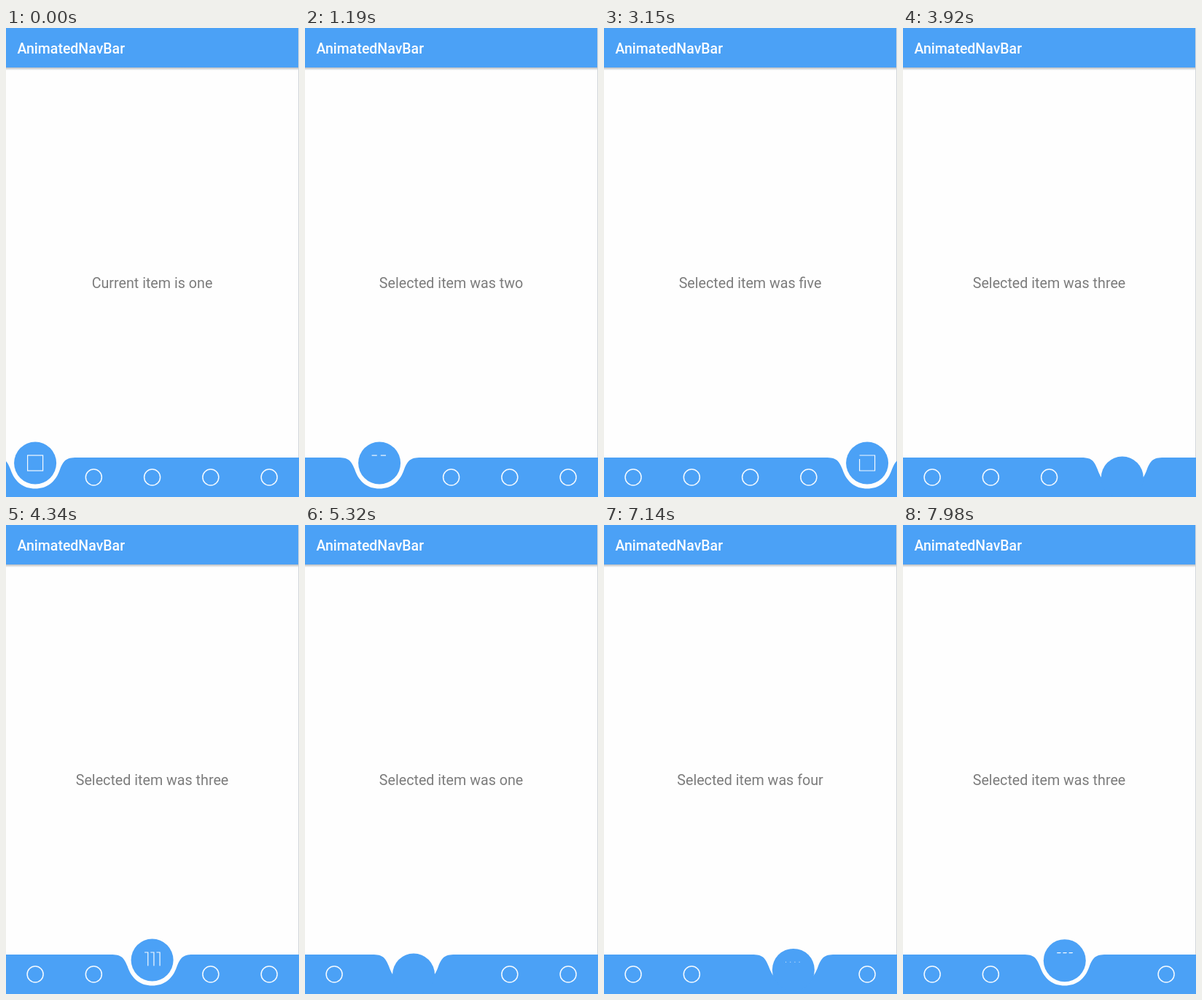
Animation of 402x642 px, one loop 8000 ms. Source, as an HTML page:

```html
<!DOCTYPE html>
<html lang="en">
<head>
<meta charset="utf-8">
<title>AnimatedNavBar</title>
<style>
  html, body { margin: 0; width: 100%; height: 100%; overflow: hidden; background: #fefefe; }
  svg { display: block; width: 402px; height: 642px; }
  text { font-family: Roboto, sans-serif; }
  .title { font-size: 19.5px; font-weight: 500; fill: #fbfdff; }
  .label { font-size: 19.7px; fill: #7c7c7c; text-anchor: middle; }
  .blue { fill: #4ba1f6; }
  .line { fill: none; stroke: #f4faff; }
</style>
</head>
<body>
<svg viewBox="0 0 402 642">
  <defs>
    <linearGradient id="shade" x2="0" y2="1">
      <stop offset="0" stop-color="#b9bcc0"/>
      <stop offset="1" stop-color="#fefefe"/>
    </linearGradient>
  </defs>
  <rect width="402" height="642" fill="#fefefe"/>
  <rect y="54" width="402" height="4" fill="url(#shade)"/>
  <rect class="blue" width="402" height="54"/>
  <rect x="401" width="1" height="642" fill="#d3d6da"/>
  <text class="title" x="15.5" y="34.5">AnimatedNavBar</text>
  <text class="label" id="label" x="200.5" y="356"></text>
  <path class="blue" id="bar"/>
  <g class="line" id="rings" stroke-width="1.5"></g>
  <g id="ball">
    <circle class="blue" r="29"/>
    <g class="line" id="icons" stroke-width="1.2"></g>
  </g>
</svg>
<script>
const LOOP = 8000, SLIDE = 550, DRAW = 1000, BOB = 200;
const TOP = 588, REST = 595.5, DEPTH = 20, REACH = 60;
const WORDS = ['one', 'two', 'three', 'four', 'five'];
const BOXES = [1, 2, 3, 4, 1];
// tap time, tapped item
const TAPS = [[815, 1], [2080, 4], [3690, 2], [5110, 0], [6696, 3], [7620, 2]];

const $ = id => document.getElementById(id);
const itemX = i => 40.1 + 80.25 * i;
const clamp = v => Math.min(1, Math.max(0, v));
const wave = p => (1 - Math.cos(Math.PI * clamp(p))) / 2;

function add(parent, tag, attrs) {
  const el = document.createElementNS('http://www.w3.org/2000/svg', tag);
  for (const key in attrs) el.setAttribute(key, attrs[key]);
  return parent.appendChild(el);
}

// cubic-bezier(.4, 0, .2, 1)
function standard(p) {
  let lo = 0, hi = 1;
  for (let i = 0; i < 18; i++) {
    const s = (lo + hi) / 2, r = 1 - s;
    if (1.2 * r * r * s + 0.6 * r * s * s + s ** 3 < p) lo = s; else hi = s;
  }
  return 3 * lo * lo - 2 * lo ** 3;
}

const rings = WORDS.map((_, i) =>
  add($('rings'), 'circle', { cx: itemX(i), cy: 615, r: 11 }));

const icons = BOXES.map(n => {
  const g = add($('icons'), 'g', {});
  const gap = 3.5, w = (21 - gap * (n - 1)) / n;
  for (let i = 0; i < n; i++)
    add(g, 'rect', { x: -10.5 + i * (w + gap), y: -10.5, width: w, height: 21, pathLength: 1 });
  return g;
});

function barPath(x) {
  const p = (dx, y) => `${(x + dx).toFixed(2)},${y} `;
  return `M-90,${TOP} L${p(-57, TOP)}C${p(-42, TOP)}${p(-39, 592)}${p(-34, 604)}` +
    `C${p(-28, 622)}${p(-16, 630.5)}${p(0, 630.5)}C${p(16, 630.5)}${p(28, 622)}${p(34, 604)}` +
    `C${p(39, 592)}${p(42, TOP)}${p(57, TOP)}L492,${TOP} V642 H-90 Z`;
}

function pose(t) {
  let from = 0, to = 0, start = -1e5, label = 'Current item is one';
  for (const [time, item] of TAPS) {
    if (t < time) break;
    from = to;
    to = item;
    start = time;
    label = 'Selected item was ' + WORDS[to];
  }
  const age = t - start, span = Math.abs(itemX(to) - itemX(from));
  // moment the ball comes within reach of the new item
  const near = span ? SLIDE * Math.acos(1 - 2 * (1 - REACH / span)) / Math.PI : 0;
  return {
    from, to, label,
    x: itemX(from) + (itemX(to) - itemX(from)) * wave(age / SLIDE),
    y: REST + DEPTH * (wave(age / BOB) - wave((age - near) / BOB)),
    trim: standard(clamp((age - near) / DRAW)),
    fade: 1 - clamp(age / 150)
  };
}

function render(t) {
  const s = pose(t);
  if ($('label').textContent !== s.label) $('label').textContent = s.label;
  $('bar').setAttribute('d', barPath(s.x));
  $('ball').setAttribute('transform', `translate(${s.x.toFixed(2)} ${s.y.toFixed(2)})`);
  rings.forEach((ring, i) =>
    ring.setAttribute('opacity', clamp((Math.abs(itemX(i) - s.x) - 63) / 12)));
  icons.forEach((icon, i) => {
    const current = i === s.to;
    icon.setAttribute('opacity', current ? +(s.trim > 0) : i === s.from ? s.fade : 0);
    icon.setAttribute('stroke-dasharray', current && s.trim < 0.999 ? `${s.trim} 2` : 'none');
  });
}

function tick() {
  render(performance.now() % LOOP);
  requestAnimationFrame(tick);
}
tick();
</script>
</body>
</html>
```
